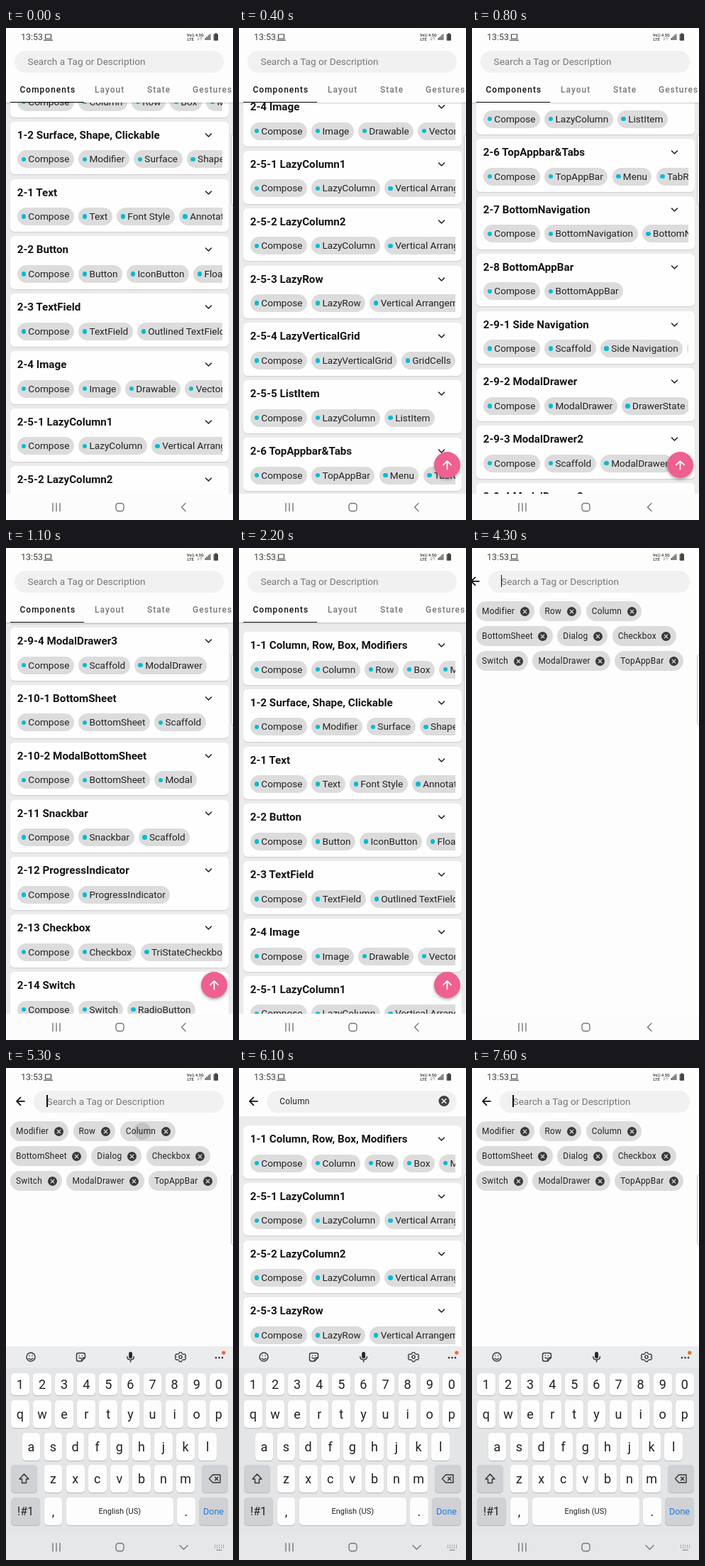
These frames come from a looping animation (320x693 px, 8 s). An HTML page:

```html
<!DOCTYPE html>
<html lang="en">
<head>
<meta charset="utf-8">
<title>Component catalogue</title>
<style>
html, body { margin: 0; width: 100%; height: 100%; overflow: hidden; background: #fdfdfd; }
#stage { position: relative; width: 320px; height: 693px; overflow: hidden; background: #fdfdfd; font: 13.6px Roboto, sans-serif; color: #222; white-space: nowrap; }
#stage div, #stage svg { position: absolute; box-sizing: border-box; }
svg { left: 0; top: 0; width: 100%; height: 100%; overflow: visible; fill: none; stroke-linecap: round; stroke-linejoin: round; }
.view { left: 0; width: 320px; overflow: hidden; }
.page { top: 0; width: 320px; height: 100%; background: #ebebeb; }
.card { left: 6px; width: 308px; height: 74.6px; border-radius: 6px; background: #fefefe; box-shadow: 0 1px 1.5px #0002; }
.title { left: 9.7px; top: 9px; font-weight: 700; font-size: 15.2px; line-height: 20px; color: #151515; }
#stage .chips { left: 10px; top: 40.5px; width: 288.5px; height: 25px; overflow: hidden; display: flex; gap: 6.2px; }
#stage .chip { position: relative; flex: none; height: 25px; padding: 0 6.5px 0 15.3px; border-radius: 13px; background: #dcdcdc; line-height: 25px; }
.chip::before { content: ""; position: absolute; left: 5.6px; top: 9.3px; width: 6.4px; height: 6.4px; border-radius: 50%; background: var(--dot); }
#tabs { left: 0; top: 68px; width: 320px; height: 37px; background: #fdfdfd; box-shadow: 0 1px 2px #0003; }
.tab { top: 10px; line-height: 19px; font-weight: 500; font-size: 11.9px; letter-spacing: 1.06px; }
#indicator { top: 35.5px; height: 1.6px; background: #111; }
#field { top: 31.5px; height: 31px; border-radius: 16px; background: #f1f1f1; line-height: 31px; }
#hint { left: 18.3px; color: #777; }
#query { left: 18px; font-size: 11.9px; letter-spacing: .22px; }
#cursor { width: 1.6px; height: 17px; top: 6px; background: #111; }
#stage .tags { left: 6px; display: flex; gap: 6.4px; }
#stage .tag { position: relative; flex: none; height: 28px; padding: 0 28px 0 8px; border-radius: 14px; background: #dcdcdc; line-height: 28px; font-size: 11.9px; letter-spacing: .25px; overflow: hidden; }
#stage .tag svg { left: auto; right: 7.5px; top: 7.5px; width: 13px; height: 13px; }
#fab { left: 275px; top: 597px; width: 37px; height: 37px; border-radius: 50%; background: #ee608f; box-shadow: 0 2px 4px #0005; }
#keyboard { left: 0; top: 392px; width: 320px; height: 264px; background: #e4e5e7; }
#toolbar { left: 0; top: 0; width: 320px; height: 30px; background: #ebecee; }
.key { border-radius: 5px; background: #fdfdfd; box-shadow: 0 1px 1px #0003; text-align: center; font-size: 18px; }
#nav { left: 0; top: 656px; width: 320px; height: 37px; }
#handle { left: 317px; top: 149px; width: 8px; height: 101px; border: 1px solid #c4c4c4; border-radius: 4px; background: #fafafa; }
</style>
</head>
<body>
<div id="stage">
  <div id="home" class="view" style="top:105px;height:551px">
    <div id="components" class="page"></div>
    <div id="layout" class="page"></div>
  </div>
  <div id="tabs"><div id="indicator"></div></div>
  <div id="results" class="view" style="top:68px;height:588px"></div>
  <div id="suggestions" class="view" style="top:63px;height:593px;background:#fdfdfd"></div>
  <div id="fab"><svg stroke="#fff" stroke-width="1.7"><path d="M18.5 24.5V13M13 18.3l5.5-5.5 5.5 5.5"/></svg></div>

  <svg id="arrow" stroke="#111" stroke-width="1.7"><path d="M26 46.8H15.5M20.5 41.3L15 46.8l5.5 5.5"/></svg>
  <div id="field">
    <div id="hint">Search a Tag or Description</div>
    <div id="query"></div>
    <div id="cursor"></div>
  </div>
  <svg id="clear"><circle cx="289" cy="46.5" r="7.6" fill="#444"/><path d="M286.2 43.7l5.6 5.6m0-5.6l-5.6 5.6" stroke="#fff" stroke-width="1.4"/></svg>
  <svg id="spinner" stroke="#00bcd4" stroke-width="2"><path d="M289 39.5a7 7 0 0 1 7 7"/></svg>

  <svg><g fill="#444">
    <text x="21" y="17" font-size="12.5">13:53</text>
    <path d="M55.5 9h8v6h-8zM53.5 17.2h12" fill="none" stroke="#444" stroke-width="1.2"/>
    <g font-size="5.6" font-weight="700">
      <text x="255" y="11.5">Vo))</text><text x="255.5" y="17.5">LTE</text><text x="267" y="11.5">4.5G</text>
    </g>
    <path d="M271 13v4m-1.3-1.3L271 17l1.3-1.3M275 17v-4m-1.3 1.3L275 13l1.3 1.3" fill="none" stroke="#999" stroke-width=".8"/>
    <path d="M280.5 14h1.4v3h-1.4zM282.6 12.3h1.4V17h-1.4zM284.7 10.3h1.4V17h-1.4zM286.8 8.5h1.4V17h-1.4z"/>
    <path d="M293.5 9h1.5V7.8h2V9h1.5v8.2h-5z" stroke="#444"/>
  </g></svg>

  <div id="keyboard">
    <div id="toolbar"></div>
    <svg stroke="#333" stroke-width="1.4">
      <circle cx="35" cy="15" r="6"/><path d="M32 17q3 3 6 0M33 13v.2M37 13v.2"/>
      <path d="M102 9.5h7q2.5 0 2.5 2.5v4l-5 5H102q-2.5 0-2.5-2.5V12q0-2.5 2.5-2.5zM111 16q-4.5-.5-4.5 4.5M103.5 13v.2M107.5 13v.2M103 16q1.5 1.5 3 .5"/>
      <rect x="173.8" y="8.5" width="3.6" height="8" rx="1.8" fill="#222"/><path d="M170.8 14.5q0 4.5 4.8 4.5t4.8-4.5M175.6 19v3"/>
      <circle cx="246" cy="15" r="2.1"/><path d="M244.5 8.5h3l.7 2 2 .9 2-.5 1.5 2.6-1.5 1.5 1.5 1.6-1.5 2.6-2-.5-2 .9-.7 2h-3l-.7-2-2-.9-2 .5-1.5-2.6 1.5-1.6-1.5-1.5 1.5-2.6 2 .5 2-.9z" stroke-width="1.2"/>
      <path d="M296 16v.1M300.5 16v.1M305 16v.1" stroke-width="2.6"/><circle cx="306.8" cy="9" r="2.6" fill="#f26522" stroke="none"/>
    </svg>
  </div>
  <div id="nav"><svg stroke="#777" stroke-width="1.4">
    <path d="M66 13.5v11M71 13.5v11M76 13.5v11"/><rect x="155" y="13.5" width="11" height="11" rx="3.5"/>
    <path id="back" d="M253 13.5l-5.5 5.5 5.5 5.5"/>
    <g id="hide"><path d="M245 16.5l5.5 5.5 5.5-5.5"/><path d="M294 16.5h13M294 19.5h13" stroke-dasharray="1 2" stroke-linecap="butt" stroke-width="1.6"/><path d="M297 23h7" stroke-width="1.1"/></g>
  </svg></div>
  <div id="handle"></div>
</div>
<script>
const $ = id => document.getElementById(id);
const LOOP = 8000, PITCH = 80.83;
const CYAN = '#00bcd4', YELLOW = '#ffe52e';

function add(parent, cls, css, html = '') {
  const el = document.createElement('div');
  el.className = cls;
  el.style.cssText = css;
  el.innerHTML = html;
  parent.append(el);
  return el;
}

// Each line: title | chips after "Compose"
const parse = text => text.trim().split('\n').map(line => {
  const [title, chips] = line.trim().split('|');
  return { title, chips: ['Compose', ...chips.split(',')] };
});

const components = parse(`1-1 Column, Row, Box, Modifiers|Column,Row,Box,Modifier
  1-2 Surface, Shape, Clickable|Modifier,Surface,Shape
  2-1 Text|Text,Font Style,Annotated String
  2-2 Button|Button,IconButton,FloatingActionButton
  2-3 TextField|TextField,Outlined TextField
  2-4 Image|Image,Drawable,Vector
  2-5-1 LazyColumn1|LazyColumn,Vertical Arrangement
  2-5-2 LazyColumn2|LazyColumn,Vertical Arrangement
  2-5-3 LazyRow|LazyRow,Vertical Arrangement
  2-5-4 LazyVerticalGrid|LazyVerticalGrid,GridCells
  2-5-5 ListItem|LazyColumn,ListItem
  2-6 TopAppbar&amp;Tabs|TopAppBar,Menu,TabRow
  2-7 BottomNavigation|BottomNavigation,BottomNavigationItem
  2-8 BottomAppBar|BottomAppBar
  2-9-1 Side Navigation|Scaffold,Side Navigation,Drawer
  2-9-2 ModalDrawer|ModalDrawer,DrawerState
  2-9-3 ModalDrawer2|Scaffold,ModalDrawer,DrawerState
  2-9-4 ModalDrawer3|Scaffold,ModalDrawer
  2-10-1 BottomSheet|BottomSheet,Scaffold
  2-10-2 ModalBottomSheet|BottomSheet,Modal
  2-11 Snackbar|Snackbar,Scaffold
  2-12 ProgressIndicator|ProgressIndicator
  2-13 Checkbox|Checkbox,TriStateCheckbox
  2-14 Switch|Switch,RadioButton
  2-15 Slider|Slider,RangeSlider
  2-16 Dialog|Dialog,AlertDialog`);

const layouts = parse(`3-1 Custom Modifier|Custom Modifier,Measurable
  3-2-1 Custom Layout|Custom Layout,Measurable
  3-2-2 Custom Layout|MeasurePolicy,IntrinsicWidth
  3-3-1 Scope and ParentDataModifier|Custom Layout,Scope,ParentData
  3-4 BoxWithConstraints|BoxWithConstraints`);

function buildList(parent, items, dot) {
  const list = add(parent, '', 'left:0;top:0;width:320px;--dot:' + dot);
  items.forEach((item, i) => add(list, 'card', `top:${13 + i * PITCH}px`,
    `<div class="title">${item.title}</div>
     <div class="chips">${item.chips.map(c => `<div class="chip">${c}</div>`).join('')}</div>
     <svg stroke="#222" stroke-width="1.6"><path d="M275.5 17l4 4 4-4"/></svg>`));
  return list;
}

const mainList = buildList($('components'), components, CYAN);
buildList($('layout'), layouts, YELLOW);
buildList(add($('results'), 'page', 'left:0'), [0, 6, 7, 8].map(i => components[i]), CYAN);

const tabs = [['Components', 19.5], ['Layout', 125], ['State', 199], ['Gestures', 263]]
  .map(([name, x]) => add($('tabs'), 'tab', `left:${x}px`, name));

const cross = '<svg><circle cx="6.5" cy="6.5" r="6.5" fill="#383838"/><path d="M4.2 4.2l4.6 4.6m0-4.6l-4.6 4.6" stroke="#eee" stroke-width="1.2"/></svg>';
const tags = {};
['Modifier,Row,Column', 'BottomSheet,Dialog,Checkbox', 'Switch,ModalDrawer,TopAppBar'].forEach((row, i) => {
  const line = add($('suggestions'), 'tags', `top:${12 + i * 35}px`);
  for (const name of row.split(',')) tags[name] = add(line, 'tag', '', name + cross);
});

function key(x, y, w, h, label, css = '') {
  return add($('keyboard'), 'key', `left:${x}px;top:${y}px;width:${w}px;height:${h}px;line-height:${h}px;${css}`, label);
}
const keyRow = (chars, x, y, h) => [...chars].forEach((c, i) => key(x + i * 31.1, y, 25.8, h, c));
const GREY = 'background:#d0d1d4;';
const icon = d => `<svg stroke="#333" stroke-width="1.4"><path d="${d}"/></svg>`;
keyRow('1234567890', 7, 38, 31);
keyRow('qwertyuiop', 7, 76, 39);
keyRow('asdfghjkl', 22.5, 121.5, 39);
key(7, 167, 37, 39, icon('M18.5 13l6.5 7h-3.5v5.5h-6V20H12z'), GREY);
keyRow('zxcvbnm', 53.7, 167, 39);
key(276, 167, 37, 39, icon('M10.5 19.5l5-5.5h10.5v11H15.5zM18.5 17.3l4.4 4.4m0-4.4l-4.4 4.4'), GREY);
key(7, 213, 41, 39, '!#1', GREY + 'font-size:16px');
key(53.7, 213, 25.8, 39, ',');
key(85, 213, 150.5, 39, 'English (US)', 'font-size:11px');
key(241, 213, 25.5, 39, '.');
key(272, 213, 41, 39, 'Done', GREY + 'font-size:12.5px;color:#1a7be0');

const mix = (a, b, p) => a + (b - a) * p;

// Linear interpolation through [time, value] points
function track(t, points) {
  const i = points.findIndex(p => p[0] > t);
  if (i < 0) return points[points.length - 1][1];
  if (i === 0) return points[0][1];
  const [t0, v0] = points[i - 1], [t1, v1] = points[i];
  return mix(v0, v1, (t - t0) / (t1 - t0));
}

const show = (id, on) => $(id).style.display = on ? '' : 'none';

function draw(t) {
  const scroll = track(t, [[0, 67], [100, 105], [200, 105], [300, 230], [400, 430], [500, 610], [600, 710], [700, 710],
    [800, 851], [900, 1090], [1000, 1270], [1100, 1380], [1200, 1430], [2100, 1430], [2200, 0]]);
  const swipe = track(t, [[2900, 0], [3000, .08], [3100, .38], [3200, .74], [3300, .94], [3400, 1]]);
  const open = track(t, [[4200, 0], [4300, 10.5], [4400, 20], [4500, 25], [4600, 27]]);
  const rise = track(t, [[4300, 0], [4400, .2], [4500, .55], [4600, .85], [4700, .96], [4800, 1]]);
  const searching = t >= 4300;
  const filled = t >= 5600 && t < 6600;
  const results = t >= 5700 && t < 6600;

  mainList.style.transform = `translateY(${-scroll}px)`;
  $('components').style.left = -320 * swipe + 'px';
  $('layout').style.left = 320 * (1 - swipe) + 'px';
  $('indicator').style.left = mix(6, 110, swipe) + 'px';
  $('indicator').style.width = mix(104, 70, swipe) + 'px';
  const selected = Math.round(swipe);
  tabs.forEach((tab, i) => tab.style.color = i === selected ? '#111' : '#777');

  show('home', !searching);
  show('tabs', !searching);
  show('fab', t >= 400 && t < 2300);
  show('results', results);
  show('suggestions', searching && !results);
  tags.Column.style.background = t >= 5300 && t < 5700
    ? `radial-gradient(circle at 40% 50%, #c4c4c4 ${track(t, [[5300, 25], [5500, 100]])}%, #dcdcdc 0)` : '';

  show('arrow', searching);
  $('arrow').style.left = open - 27 + 'px';
  $('field').style.left = 12.3 + open + 'px';
  $('field').style.width = 295 - open + 'px';
  $('query').textContent = filled ? 'Column' : '';
  show('hint', !filled);
  show('cursor', searching && Math.floor((t - (t < 5600 ? 4300 : 5600)) / 500) % 2 === 0);
  $('cursor').style.left = 18 + $('query').offsetWidth + 'px';
  show('clear', results);
  show('spinner', filled && !results);

  $('keyboard').style.transform = `translateY(${264 * (1 - rise)}px)`;
  show('back', rise === 0);
  show('hide', rise > 0);
  $('nav').style.background = rise > 0 ? '#e6e7e9' : '#fcfcfc';
}

function frame() {
  draw(Math.floor(performance.now() % LOOP / 100) * 100);
  requestAnimationFrame(frame);
}
frame();
</script>
</body>
</html>
```
